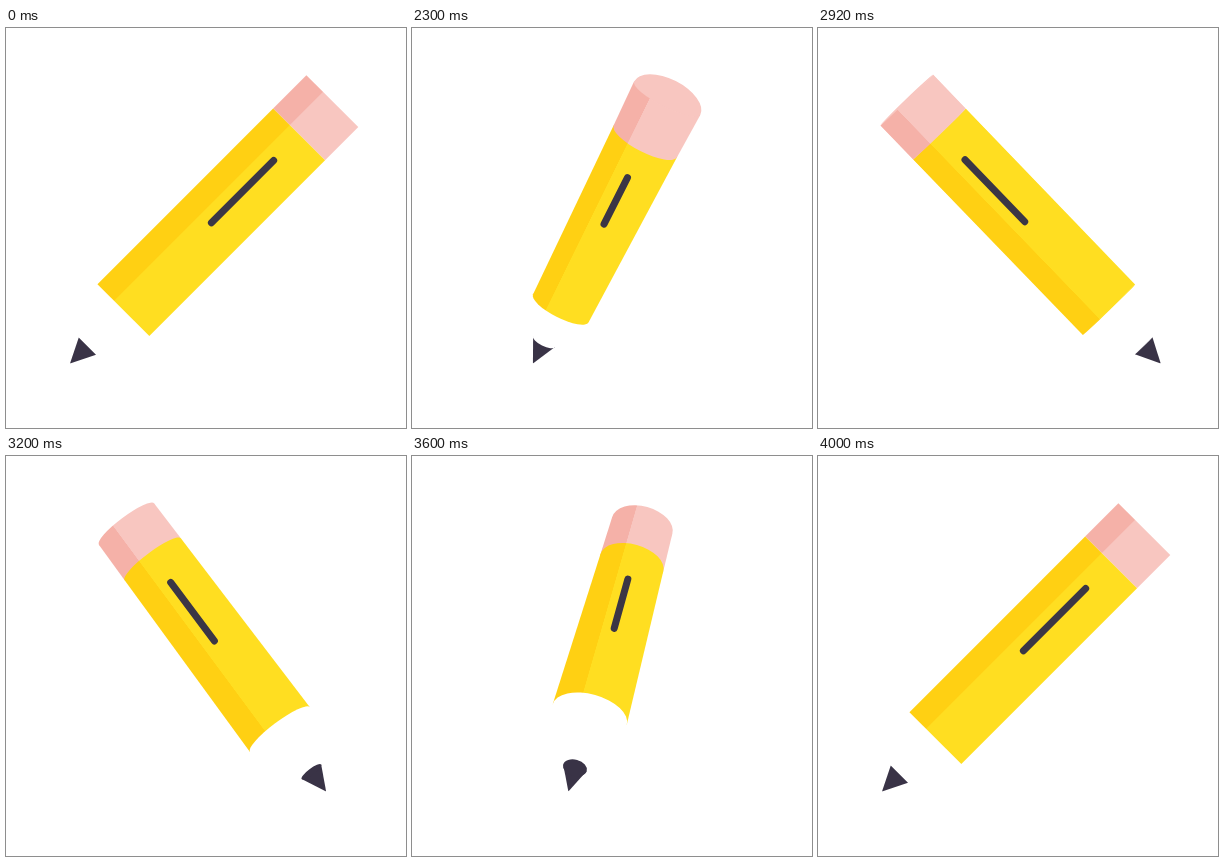
Write an HTML page without scripts that moves like this. It is 400 px wide and 400 px high and loops after 4.02 s.

```html
<!DOCTYPE html>
<html lang="en">
<head>
<meta charset="utf-8">
<title>Swinging pencil</title>
<style>
/* turn: 0 leans right, 1 leans left. near / away: how far the top tips to or from the viewer. */
@property --turn { syntax: "<number>"; inherits: true; initial-value: 0; }
@property --near { syntax: "<number>"; inherits: true; initial-value: 0; }
@property --away { syntax: "<number>"; inherits: true; initial-value: 0; }

html, body { margin: 0; width: 100%; height: 100%; overflow: hidden; background: #fff; }

/* The point of the pencil is the origin; y counts up the shaft, w is half a width. */
.pencil {
  --y-tip: 24.6px;
  --y-low: calc(75.5px - 20px * var(--near) + 4.8px * var(--away));
  --y-mid: calc(324px - 110px * var(--near) - 96px * var(--away));
  --y-top: calc(371px - 108px * var(--near) - 105px * var(--away));
  --w-tip: 12.2px;
  --w-low: calc(36.7px - 8.2px * var(--near) + 1.9px * var(--away));
  --w-mid: calc(36.7px - 1.8px * var(--near) - 4.6px * var(--away));
  --w-top: calc(36.7px + .6px * var(--near) - 6.1px * var(--away));
  --edge: calc(50% - 13.4px - 2px * var(--near) + 2.2px * var(--away));
  --lean: calc(90deg - 1deg * var(--near) + .6deg * var(--away));
  position: absolute;
  left: 0;
  top: 0;
  transform: translate(calc(64px + 282px * var(--turn)), 335.5px) rotate(calc(45deg - 90deg * var(--turn)));
  animation: turn 4020ms cubic-bezier(.4, 0, .6, 1) 1995ms infinite,
             tip-over 4020ms cubic-bezier(.4, 0, .6, 1) 1995ms infinite;
}
@keyframes turn {
  0%, 49.751%, 100% { --turn: 0; }
  24.876% { --turn: 1; }
}
@keyframes tip-over {
  0%, 24.876%, 49.751%, 100% { --near: 0; --away: 0; }
  12.438% { --near: 1; --away: 0; }
  37.313% { --near: 0; --away: 1; }
}

.pencil div { position: absolute; left: -60px; top: -420px; width: 120px; height: 420px; }

/* Colours */
.pink, .yellow { background: linear-gradient(var(--lean), var(--dark) var(--edge), var(--light) calc(var(--edge) + .5px)); }
.pink   { --light: #f8c6c0; --dark: #f5b1a8; }
.yellow { --light: #ffde21; --dark: #ffd013; }
.plain  { background: #f8c6c0; }
.ink    { background: #393346; }
.white  { background: #fff; }

/* Heights: a block runs from (w0, y0) to (w, y), an oval sits at y with half-height r. */
.at-tip { --w: var(--w-tip); --y: var(--y-tip); --w0: 0px; --y0: 0px; }
.at-low { --w: var(--w-low); --y: var(--y-low); }
.at-mid { --w: var(--w-mid); --y: var(--y-mid); --w0: var(--w-low); --y0: var(--y-low); }
.at-top { --w: var(--w-top); --y: var(--y-top); --w0: var(--w-mid); --y0: var(--y-mid); }

.block {
  clip-path: polygon(
    calc(50% - var(--w0)) calc(100% - var(--y0)), calc(50% + var(--w0)) calc(100% - var(--y0)),
    calc(50% + var(--w)) calc(100% - var(--y)), calc(50% - var(--w)) calc(100% - var(--y)));
}
.oval { clip-path: ellipse(var(--w) var(--r) at 50% calc(100% - var(--y))); }
.near { --r: calc(var(--bow) * var(--near)); }
.away { --r: calc(var(--bow) * var(--away)); }

.cap {
  --up: calc(28px * var(--near));
  --down: calc(13px * var(--near));
  clip-path: inset(
    calc(100% - var(--y) - var(--up)) calc(50% - var(--w)) calc(var(--y) - var(--down))
    round var(--w) / var(--up) var(--up) var(--down) var(--down));
}
.pencil .mark {
  --from: calc(196px - 63.3px * var(--near) - 33.6px * var(--away));
  --to: calc(291px - 116.3px * var(--near) - 74.6px * var(--away));
  left: -2.8px;
  top: calc(0px - var(--to));
  width: 6.5px;
  height: calc(var(--to) - var(--from));
  border-radius: 4px;
  background: #3b3645;
}
</style>
</head>
<body>
<div class="pencil">
  <div class="pink oval away at-top" style="--bow: 21px"></div>
  <div class="pink block at-top"></div>
  <div class="plain cap at-top"></div>
  <div class="yellow oval near at-low" style="--bow: 14px"></div>
  <div class="yellow block at-mid"></div>
  <div class="yellow oval away at-mid" style="--bow: 20.5px"></div>
  <div class="pink oval near at-mid" style="--bow: 16px"></div>
  <div class="white oval away at-low" style="--bow: 22.5px"></div>
  <div class="mark"></div>
  <div class="ink block at-tip"></div>
  <div class="ink oval away at-tip" style="--bow: 9px"></div>
  <div class="white oval near at-tip" style="--bow: 6.5px"></div>
</div>
</body>
</html>
```
